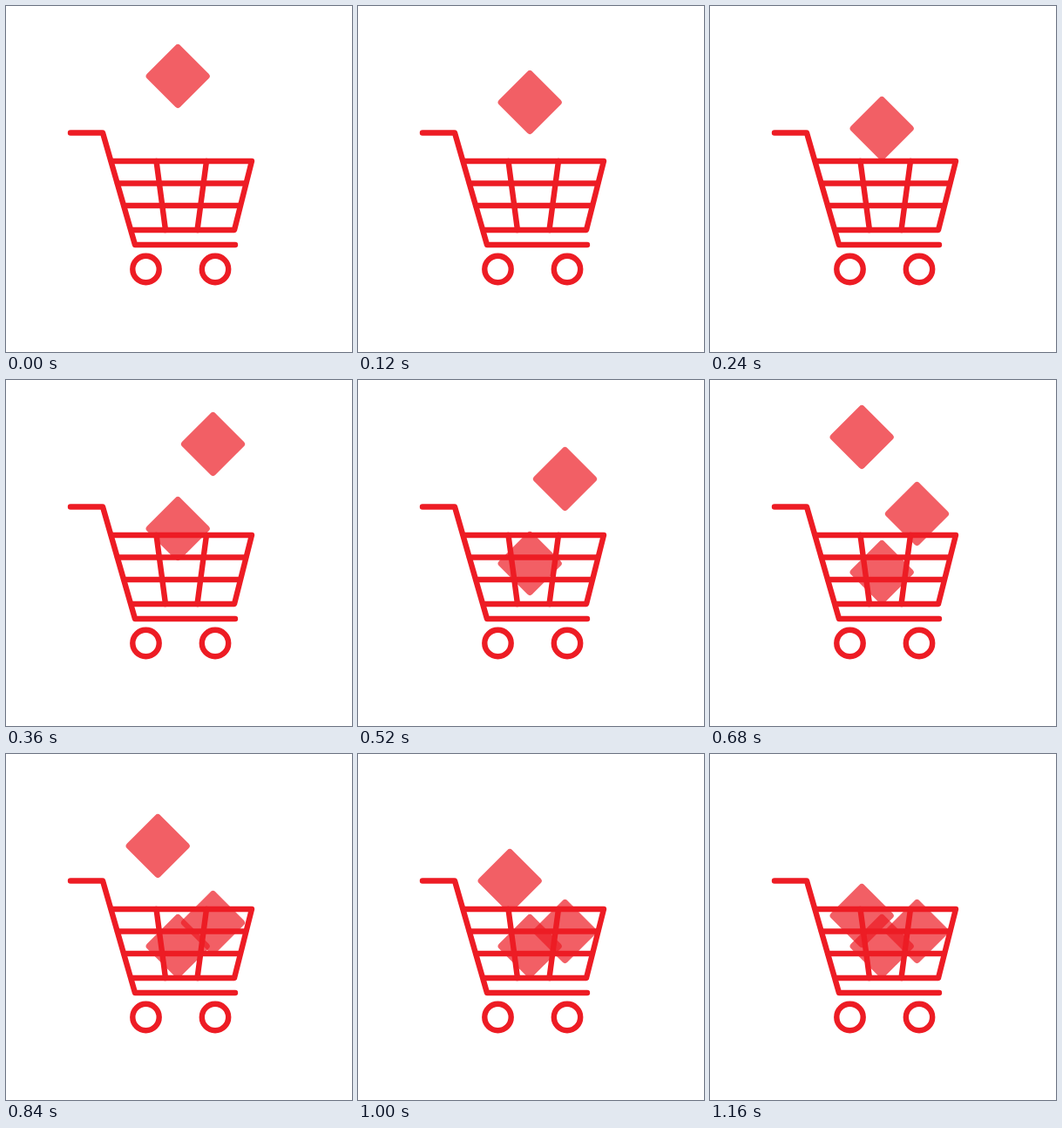
These frames come from a looping animation (397x397 px, 1.2 s). An HTML page:

```html
<!DOCTYPE html>
<html lang="en">
<head>
<meta charset="utf-8">
<title>Filling cart</title>
<style>
html, body { margin: 0; width: 100%; height: 100%; overflow: hidden; background: #fff; }
svg { display: block; width: 100%; height: 100%; }
.cart { fill: none; stroke: #ed1c24; stroke-width: 6.4; stroke-linecap: round; stroke-linejoin: round; }
.item { fill: #ed1c24; fill-opacity: .7; }
</style>
</head>
<body>
<svg viewBox="0 0 397 397">
  <g id="items"></g>
  <g class="cart">
    <path d="M74 145.5H111L148 274H263"/>
    <path d="M121 178H282L262 257H144"/>
    <path d="M128 203.5H275M135.500 229H268"/>
    <path d="M172.500 178L183 257M230 178L219.500 257"/>
    <circle cx="160.500" cy="302" r="15.2"/>
    <circle cx="240" cy="302" r="15.2"/>
  </g>
</svg>
<script>
const LOOP = 1200, STEP = 40, FALL = 14, SPEED = 10;
const SIDE = 54, RADIUS = 4;

const items = [
  { x: 197.2, y: 80.5, start: 0 },
  { x: 237.5, y: 63.5, start: 320 },
  { x: 174.2, y: 45.5, start: 600 }
];

const group = document.getElementById('items');
for (const item of items) {
  const node = document.createElementNS('http://www.w3.org/2000/svg', 'rect');
  const attrs = { class: 'item', x: -SIDE / 2, y: -SIDE / 2, width: SIDE, height: SIDE, rx: RADIUS };
  for (const name in attrs) node.setAttribute(name, attrs[name]);
  item.node = group.appendChild(node);
}

// Each item drops at constant speed in fixed steps, then rests in the cart.
function draw(time) {
  const tick = Math.floor((time % LOOP) / STEP);
  for (const { x, y, start, node } of items) {
    const age = tick - start / STEP;
    const top = y + SPEED * Math.min(Math.max(age, 0), FALL);
    node.setAttribute('visibility', age < 0 ? 'hidden' : 'visible');
    node.setAttribute('transform', `translate(${x} ${top}) rotate(45)`);
  }
}

let origin;
function loop(now) {
  origin ??= now;
  draw(now - origin);
  requestAnimationFrame(loop);
}
draw(0);
requestAnimationFrame(loop);
</script>
</body>
</html>
```
